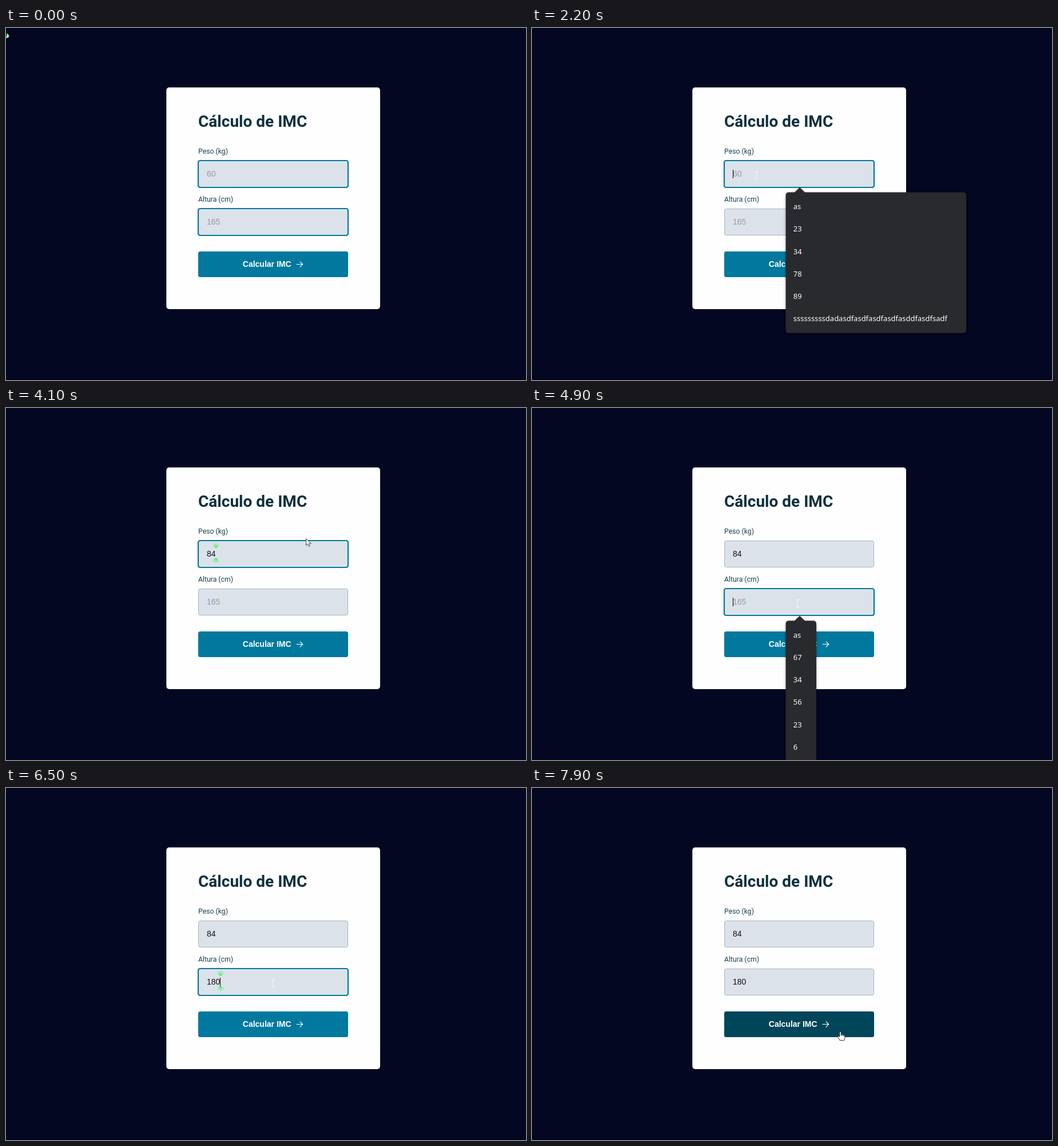
An HTML page that plays this animation: 909x616 px, repeating every 8 s.

```html
<!DOCTYPE html>
<html lang="pt">
<head>
<meta charset="utf-8">
<title>Cálculo de IMC</title>
<style>
  html, body { margin: 0; width: 100%; height: 100%; overflow: hidden; background: #030722; }
  svg { display: block; }
  .title { font: 700 28px Roboto, sans-serif; fill: #0e303e; }
  .label { font: 400 12.25px Roboto, sans-serif; fill: #17414f; }
  .value { font: 400 14px "Liberation Sans", sans-serif; }
  .action { font: 700 14px "Liberation Sans", sans-serif; fill: #fff; }
  .option { font: 400 13px "Noto Sans", sans-serif; fill: #fff; }
  .box { fill: #dce2e9; stroke: #a7b3be; }
  .ring { fill: none; stroke: #04789b; stroke-width: 2.2; }
  .menu { filter: drop-shadow(0 2px 2px rgba(0, 0, 0, .4)); }
</style>
</head>
<body>
<svg width="909" height="616" viewBox="0 0 909 616">
  <defs>
    <radialGradient id="glow" cx=".5" cy=".85" r=".65">
      <stop offset="0" stop-color="#2fe45c"/>
      <stop offset=".45" stop-color="#8deda4"/>
      <stop offset="1" stop-color="#a9efba"/>
    </radialGradient>
  </defs>
  <rect width="909" height="616" fill="#030722"/>
  <rect x="280.3" y="104" width="373.7" height="388" rx="5" fill="#fefefe"/>
  <text class="title" x="336" y="173.3">Cálculo de IMC</text>
  <text class="label" x="336" y="220">Peso (kg)</text>
  <text class="label" x="336" y="304">Altura (cm)</text>
  <g id="fields"></g>
  <rect id="button" x="336" y="391" width="262" height="45" rx="3.5"/>
  <text class="action" x="413.8" y="418">Calcular IMC</text>
  <path d="M508 413.5H518.5M514 408.8L518.7 413.5L514 418.2" fill="none" stroke="#fff" stroke-width="1.1" stroke-linecap="round" stroke-linejoin="round"/>
  <g id="marker">
    <path id="lobe" d="M-5.5 -13.5C-5.5 -19 5.5 -19 5.5 -13.5Q3 -9.5 0 -9Q-3 -9.5 -5.5 -13.5Z" fill="url(#glow)"/>
    <use href="#lobe" transform="scale(1,-1)"/>
  </g>
  <rect id="caret" width="1" height="15" fill="#000"/>
  <g id="menus"></g>
  <path id="beam" d="M-3.5 -6.5H-1L0 -5.7L1 -6.5H3.5M0 -6V6M-3.5 6.5H-1L0 5.7L1 6.5H3.5" fill="none" stroke="#fafafa"/>
  <path id="arrow" d="M.5 .5V12.3L3.2 9.7L5.2 14.3L7.2 13.4L5.3 9H9.5Z" fill="#fff" stroke="#222" stroke-width=".8"/>
  <g id="hand" stroke="#111" stroke-width=".9" stroke-linejoin="round">
    <path d="M-1.3 1Q0 -.6 1.3 1V5.4Q2.8 4.5 3.8 5.8Q5.2 5 6 6.4Q7.8 5.8 8 7.6V11Q8 13.4 6.4 15.7H-.8Q-1.8 13.4 -4.2 10.2Q-5.2 8.5 -3.8 7.9Q-2.6 7.8 -1.3 9.6Z" fill="#fff"/>
    <path d="M1.3 5.4V8M3.8 5.8V8.2M6 6.4V8.6" fill="none"/>
  </g>
</svg>
<script>
const LOOP = 8000, STEP = 100, BLINK = 500, HOVER = 200, BLUR = 7900;
const FIELD_GAP = 84, ROW = 39.3, DIGIT = 7.785;
const $ = id => document.getElementById(id);
const clamp = v => Math.max(0, Math.min(1, v));
const show = (el, alpha) => el.setAttribute("opacity", +alpha);
const place = (el, x, y) => el.setAttribute("transform", `translate(${x},${y})`);

function add(parent, tag, attrs, text) {
  const el = document.createElementNS("http://www.w3.org/2000/svg", tag);
  for (const key in attrs) el.setAttribute(key, attrs[key]);
  if (text) el.textContent = text;
  return parent.appendChild(el);
}

function makeField(index, hint) {
  const y = 232 + index * FIELD_GAP, root = $("fields");
  add(root, "rect", { class: "box", x: 336.5, y: y + .5, width: 261, height: 46, rx: 3 });
  return {
    hint,
    ring: add(root, "rect", { class: "ring", x: 336, y, width: 262, height: 47, rx: 3.5 }),
    text: add(root, "text", { class: "value", x: 351, y: y + 28 })
  };
}

function makeMenu(index, width, words, open, close, fade) {
  const top = 287.6 + index * 84.6;
  const el = add($("menus"), "g", { class: "menu", fill: "#292a2d" });
  add(el, "rect", { x: 443.6, y: top, width, height: 10.3 + words.length * ROW, rx: 5 });
  add(el, "path", { d: `M458.5 ${top + .5}l9.5 -9l9.5 9Z` });
  words.forEach((word, i) =>
    add(el, "text", { class: "option", x: 456.8, y: top + 29.3 + i * ROW }, word));
  return { el, open, close, fade };
}

const fields = [makeField(0, "60"), makeField(1, "165")];
const menus = [
  makeMenu(0, 315.4, ["as", "23", "34", "78", "89", "sssssssssdadasdfasdfasdfasdfasddfasdfsadf"], 2200, 3100, 0),
  makeMenu(0, 53.4, ["89"], 3100, 3400, 300),
  makeMenu(1, 53.4, ["as", "67", "34", "56", "23", "6"], 4800, 5600, 200)
];

// An empty string is the click that focuses a field
const edits = [
  { at: 2200, field: 0, text: "" },
  { at: 3100, field: 0, text: "8" },
  { at: 3500, field: 0, text: "84" },
  { at: 4800, field: 1, text: "" },
  { at: 5700, field: 1, text: "1" },
  { at: 6100, field: 1, text: "18" },
  { at: 6500, field: 1, text: "180" }
];

// Pointer waypoints: arrival time, travel time, x, y
const stops = [
  [100, 0, 44, 30],
  [500, 400, 458, 269],
  [600, 100, 392, 258],
  [3100, 100, 377, 246],
  [4300, 300, 818, 192],
  [4600, 300, 464, 342],
  [5300, 200, 466, 342],
  [7370, 270, 536, 434],
  [7400, 30, 550, 461],
  [7700, 300, 539, 426]
];

function pointerAt(t) {
  let [, , x, y] = stops[0];
  for (const [arrive, travel, nx, ny] of stops.slice(1)) {
    const p = clamp(1 - (arrive - t) / travel);
    x += (nx - x) * p;
    y += (ny - y) * p;
  }
  return [x, y];
}

function pointerKind([x, y]) {
  const over = (top, bottom) => x > 336 && x < 598 && y >= top && y <= bottom;
  return over(232, 279) || over(316, 363) ? "beam" : over(391, 436) ? "hand" : "arrow";
}

// Button tint follows the pointer at a fixed rate
function hoverLevel(t) {
  let level = 0;
  for (let s = 0; s < t; s += 10)
    level = clamp(level + (pointerKind(pointerAt(s)) === "hand" ? 10 : -10) / HOVER);
  return level;
}

function drawPointer(t) {
  const [x, y] = pointerAt(t), kind = t < stops[0][0] ? "" : pointerKind([x, y]);
  for (const id of ["beam", "hand", "arrow"]) show($(id), id === kind);
  if (kind) place($(kind), kind === "beam" ? Math.floor(x) + .5 : x, y);
}

function draw(t) {
  const past = edits.filter(e => e.at <= t);
  const last = t < BLUR ? past[past.length - 1] : null;

  fields.forEach((field, i) => {
    const own = past.filter(e => e.field === i).pop();
    const typed = own ? own.text : "";
    field.text.textContent = typed || field.hint;
    field.text.setAttribute("fill", typed ? "#101114" : "#969ba2");
    show(field.ring, last && last.field === i);
  });

  show($("caret"), last && Math.floor((t - last.at) / BLINK) % 2 === 0);
  show($("marker"), last && last.text !== "");
  if (last) {
    const x = 351 + Math.floor(last.text.length * DIGIT), dy = last.field * FIELD_GAP;
    place($("caret"), x, 248 + dy);
    place($("marker"), x + 1, 253.8 + dy);
  }

  for (const { el, open, close, fade } of menus)
    show(el, t < open ? 0 : t < close ? 1 : fade && clamp(1 - (t - close) / fade));

  const h = hoverLevel(t), mix = (a, b) => Math.round(a + (b - a) * h);
  $("button").setAttribute("fill", `rgb(${mix(1, 0)},${mix(121, 70)},${mix(159, 90)})`);
  drawPointer(t);
}

let begin, shown;
function tick(now) {
  begin ??= now;
  const t = Math.floor(((now - begin) % LOOP) / STEP) * STEP;
  if (t !== shown) draw(shown = t);
  requestAnimationFrame(tick);
}
draw(0);
requestAnimationFrame(tick);
</script>
</body>
</html>
```
